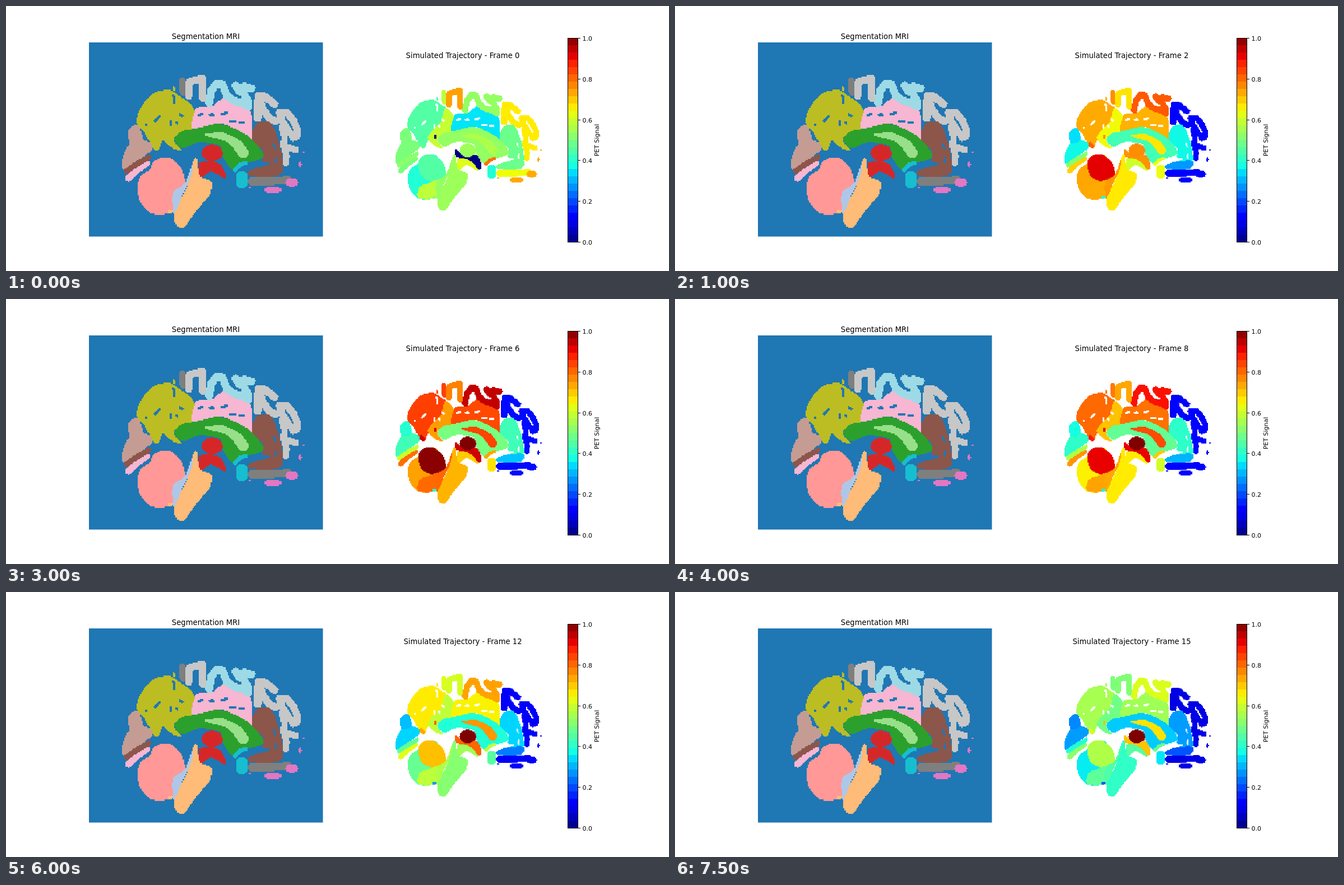
An HTML page with a canvas that plays this animation: 1183 px wide and 473 px high, repeating every 8 s.

```html
<!DOCTYPE html>
<html lang="en">
<meta charset="utf-8">
<title>Segmentation and trajectory</title>
<style>
html, body { margin: 0; width: 100%; height: 100%; overflow: hidden; background: #fff; }
canvas { display: block; }
</style>
<canvas id="stage" width="1183" height="473"></canvas>
<script>
const STEP = 500, STEPS = 16, BANDS = 28;
const LEFT = { x: 148, y: 65, w: 417.5, h: 346.5 };
const RIGHT = { x: 647.5, y: 99.5, w: 335, h: 278 };
const COLS = 192, ROWS = 160;

const olive = '#bcbd22', rose = '#c49c94', brown = '#8c564b', pale = '#f7b6d2', silver = '#c7c7c7',
  gray = '#7f7f7f', sky = '#9edae5', green = '#2ca02c', mint = '#98df8a', red = '#d62728',
  cyan = '#17becf', pink = '#e377c2', salmon = '#ff9896', lilac = '#aec7e8', peach = '#ffbb78';

// smooth closed curve through a few points
function blob(...p) {
  const path = new Path2D(), n = p.length;
  const at = i => [p[(i + n) % n], p[(i + n + 1) % n]];
  path.moveTo(...at(0));
  for (let i = 0; i < n; i += 2) {
    const [a, b, c, d] = [at(i - 2), at(i), at(i + 2), at(i + 4)];
    path.bezierCurveTo(b[0] + (c[0] - a[0]) / 7, b[1] + (c[1] - a[1]) / 7,
      c[0] - (d[0] - b[0]) / 7, c[1] - (d[1] - b[1]) / 7, ...c);
  }
  return { path };
}

// thick rounded strokes
const tube = (width, line) => ({ path: new Path2D(line), width });

function oval(x, y, rx, ry) {
  const path = new Path2D();
  path.ellipse(x, y, rx, ry, 0, 0, 7);
  return { path };
}

const regions = [];
// later regions cover earlier ones; without a colour they show on the right only
function add(shape, colour, start, peak, peakStep = 5) {
  regions.push({ ...shape, colour, start, peak, peakStep });
}
const cut = shape => regions.push({ ...shape, empty: true });

// back of the cortex
add(blob(233, 208, 240, 183, 262, 156, 290, 150, 313, 163, 336, 185, 333, 222, 300, 235, 284, 232, 272, 258, 262, 252, 246, 224),
  olive, .45, .85);
add(oval(300, 148, 2.5, 4.5), olive, .45, .85);
add(tube(9, 'M264 248L269 253'), olive, .46, .94);
add(blob(318, 168, 337, 188, 333, 223, 303, 231, 303, 246, 315, 259, 294, 252, 279, 232, 308, 198), olive, .59, .75);
cut(tube(5, 'M266 205L274 197M294 206L293 213M311 194L315 196M304 208L305 209M250 211L251 213M299 160L301 174'));
add(oval(296, 232, 3, 5), undefined, 0, .93, 6);
add(blob(207, 276, 222, 244, 250, 240, 262, 254, 242, 272, 212, 293), rose, .5, .43);
add(blob(218, 221, 235, 212, 243, 238, 222, 246), rose, .5, .4);
add(tube(12, 'M219 307L235 292L251 281'), pale, .5, .8);
add(tube(10, 'M215 295L235 281L255 270'), brown, .52, .6);

// top and front of the cortex
add(blob(333, 222, 337, 188, 346, 180, 366, 180, 388, 165, 412, 177, 437, 190, 439, 237, 418, 224, 382, 210), pale, .35, .84);
cut(tube(5, 'M364 194L370 194M384 193L394 191M400 206L409 206M418 207L424 208M344 195L350 193'));
add(tube(12, 'M314 134L316 154'), gray, .58, .86, 4.5);
add(tube(13, 'M326 160L327 135L350 129L351 164'), silver, .74, .78);
add(tube(14, 'M362 173L366 152L375 139L386 140L394 160L406 169L422 173L433 180M410 142L416 152L424 144L438 147M422 146L425 158L433 172'),
  sky, .53, .95);
add(tube(14, 'M449 200L449 178L450 161L462 162L479 175M453 168L459 186L470 200L481 206'), silver, .66, .135);
add(tube(13, 'M488 190L501 190L512 203L519 218L519 233L512 235M488 192L494 207L506 226'), silver, .66, .135);
add(tube(12, 'M493 216L497 232L496 250L500 268L499 280M500 251L517 257'), silver, .66, .135);
add(blob(439, 238, 446, 210, 472, 208, 489, 250, 492, 286, 470, 289, 458, 277, 459, 258), brown, .48, .43);
add(blob(433, 295, 455, 287, 492, 286, 488, 302, 455, 305, 433, 302), brown, .48, .32);
cut(tube(4, 'M478 247L480 254M482 271L481 279M461 282L468 282'));

// centre
add(blob(301, 240, 310, 225, 345, 217, 385, 211, 432, 232, 460, 267, 440, 278, 422, 281, 405, 293, 388, 271, 381, 249, 345, 243, 315, 254),
  green, .53, .5);
add(blob(353, 230, 385, 226, 417, 240, 433, 262, 420, 271, 395, 243), mint, .56, .84, 6.5);
add(blob(345, 280, 381, 281, 392, 308, 366, 295, 347, 307), red, .62, .7);
add(blob(340, 259, 350, 266, 368, 276, 387, 273, 397, 288, 395, 306, 372, 284, 342, 276), undefined, 0, .93, 6);
add(oval(368, 262.5, 19, 15), red, .54, 1.1, 9.5);
add(tube(7, 'M408 293L418 283L428 280'), cyan, .79, .74);
add(tube(19, 'M421 303L421 316'), cyan, .39, .7, 4);
add(tube(14, 'M438 313L470 313L503 311'), gray, .64, .135);
for (const [x, y, rx, ry] of [[510, 315, 11, 8], [476, 328, 16, 6], [525, 283, 2.5, 5], [530.5, 261, 1.5, 2], [435, 324, 3, 2]])
  add(oval(x, y, rx, ry), pink, .73, .135);

// cerebellum and stem
add(blob(237, 310, 256, 292, 288, 270, 312, 290, 317, 320, 298, 336, 305, 360, 285, 371, 257, 369, 238, 346), salmon, .39, .79, 3.7);
add(blob(258, 292, 266, 276, 288, 270, 313, 290, 318, 318, 292, 332, 266, 320), salmon, .45, 1.02, 4.3);
add(blob(257, 367, 261, 344, 288, 332, 304, 329, 305, 358, 285, 371), salmon, .58, .82, 4.4);
add(tube(6, 'M291 368L301 365'), peach, .53, .43, 4);
add(blob(334, 277, 338, 290, 318, 330, 301, 372, 298, 333, 320, 315), lilac, .53, .83, 4.2);
add(blob(340, 271, 346, 303, 366, 313, 364, 336, 342, 362, 315, 397, 300, 376, 329, 308, 334, 278), peach, .54, .74, 4.3);

const ctx = document.getElementById('stage').getContext('2d');
const grid = document.createElement('canvas');
grid.width = COLS;
grid.height = ROWS;
const cells = grid.getContext('2d', { willReadFrequently: true });

const clamp = v => Math.max(0, Math.min(1, v));

function jet(v) {
  const r = v < .89 ? (v - .35) / .31 : 1 - (v - .89) / .22;
  const g = Math.min((v - .125) / .25, (.91 - v) / .27);
  const b = Math.min(.5 + v / .22, (.65 - v) / .31);
  return `rgb(${[r, g, b].map(c => Math.round(clamp(c) * 255))})`;
}

// uptake and slow washout around the peak step
function signal({ start, peak, peakStep }, step) {
  if (step === 0) return start;
  const t = step / peakStep;
  return clamp(peak * (t * Math.exp(1 - t)) ** .48);
}

// region of each cell, with hard edges
function rasterize(shapes) {
  const map = Array(COLS * ROWS);
  const sx = COLS / LEFT.w, sy = ROWS / LEFT.h;
  cells.fillStyle = cells.strokeStyle = '#000';
  cells.lineCap = cells.lineJoin = 'round';
  for (const shape of shapes) {
    cells.clearRect(0, 0, COLS, ROWS);
    cells.setTransform(sx, 0, 0, sy, -LEFT.x * sx, -LEFT.y * sy);
    cells.lineWidth = shape.width;
    if (shape.width) cells.stroke(shape.path);
    else cells.fill(shape.path);
    cells.resetTransform();
    const { data } = cells.getImageData(0, 0, COLS, ROWS);
    for (let i = 0; i < map.length; i++)
      if (data[i * 4 + 3] > 127) map[i] = shape;
  }
  return map;
}

function paint(map, box, colour) {
  cells.clearRect(0, 0, COLS, ROWS);
  map.forEach((region, i) => {
    if (!region || region.empty) return;
    cells.fillStyle = colour(region);
    cells.fillRect(i % COLS, Math.floor(i / COLS), 1, 1);
  });
  ctx.imageSmoothingEnabled = false;
  ctx.drawImage(grid, box.x, box.y, box.w, box.h);
}

function label(text, x, y, size, align = 'center') {
  ctx.font = `${size}px "DejaVu Sans", sans-serif`;
  ctx.textAlign = align;
  ctx.fillStyle = '#000';
  ctx.fillText(text, x, y);
}

function drawScale() {
  const top = 57, height = 364, band = height / BANDS;
  for (let i = 0; i < BANDS; i++) {
    ctx.fillStyle = jet((i + .5) / BANDS);
    ctx.fillRect(1003, top + height - (i + 1) * band, 18, band);
  }
  ctx.strokeStyle = '#000';
  ctx.lineWidth = 1;
  ctx.strokeRect(1002.5, 57.5, 18, 364);
  for (let i = 0; i <= 5; i++) {
    const y = Math.round(top + height * (1 - i / 5));
    ctx.fillStyle = '#000';
    ctx.fillRect(1021, y, 4, 1);
    label((i / 5).toFixed(1), 1028.5, y + 4.5, 11, 'left');
  }
  ctx.save();
  ctx.translate(1058, 239.5);
  ctx.rotate(-Math.PI / 2);
  label('PET Signal', 0, 0, 11);
  ctx.restore();
}

const leftMap = rasterize(regions.filter(r => r.colour || r.empty));
const rightMap = rasterize(regions);

function draw(step) {
  ctx.fillStyle = '#fff';
  ctx.fillRect(0, 0, 1183, 473);
  ctx.fillStyle = '#1f77b4';
  ctx.fillRect(LEFT.x, LEFT.y, LEFT.w, LEFT.h);
  paint(leftMap, LEFT, r => r.colour);
  ctx.filter = 'drop-shadow(0 0 0.6px #333)';
  paint(rightMap, RIGHT, r => jet(signal(r, step)));
  ctx.filter = 'none';
  label('Segmentation MRI', 356.5, 58.5, 13.2);
  label('Simulated Trajectory - Frame ' + step, 815, 93, 13.2);
  drawScale();
}

const start = performance.now();
let shown = -1;
function tick() {
  const step = Math.floor((performance.now() - start) / STEP) % STEPS;
  if (step !== shown) draw(shown = step);
  requestAnimationFrame(tick);
}
tick();
</script>
</html>
```
